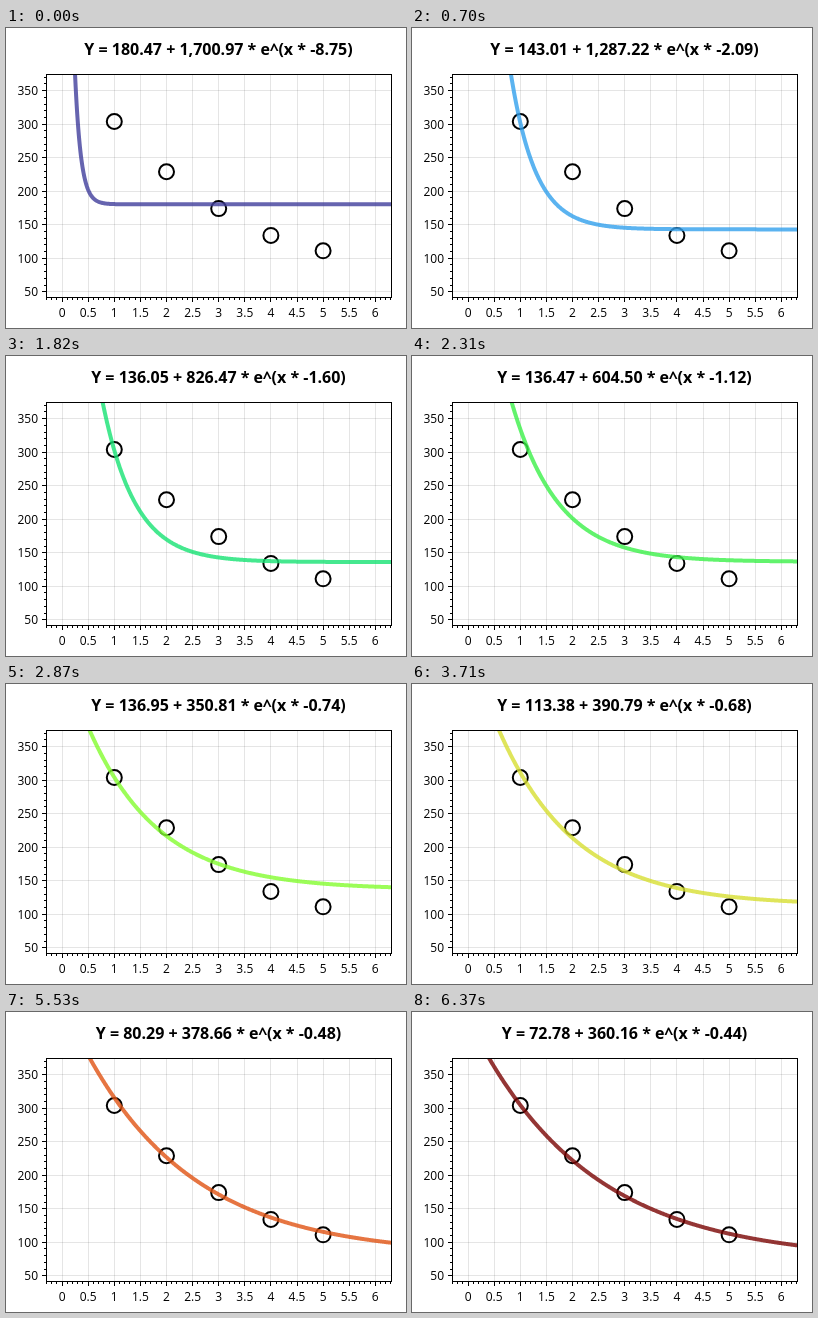
Write an HTML page with a canvas that moves like this. It is 400 by 300 pixels and loops after 8.37 s.

```html
<!DOCTYPE html>
<html lang="en">
<head>
<meta charset="utf-8">
<title>Exponential fit</title>
<style>
  html, body { margin: 0; width: 100%; height: 100%; overflow: hidden; background: #fff; }
  canvas { display: block; }
</style>
</head>
<body>
<canvas id="stage" width="400" height="300"></canvas>
<script>
const ctx = document.getElementById('stage').getContext('2d');
const LOOP = 8370, STEP = 70, END = 6370;
const box = { l: 40, t: 46, r: 385, b: 269 };
const FONT = '"Open Sans", "Noto Sans", sans-serif';

const px = x => 56.1 + x * 52.2;
const py = y => 263.7 - (y - 50) * 0.67;
const snap = v => Math.floor(v) + 0.5;
const mix = (a, b, u) => a + (b - a) * u;

// heights of the samples at x = 1, 2, 3...
const samples = [304, 229, 174, 134, 111];

// milestones of the fit y = a + b * e^(k * x)
const fits = [
  { t: 0, a: 180.47, b: 1700.97, k: -8.75 },
  { t: 700, a: 143.01, b: 1287.22, k: -2.09 },
  { t: 1820, a: 136.05, b: 826.47, k: -1.6 },
  { t: 2870, a: 136.95, b: 350.81, k: -0.74 },
  { t: 3710, a: 113.38, b: 390.79, k: -0.68 },
  { t: 4760, a: 87.18, b: 395.62, k: -0.51 },
  { t: END, a: 72.78, b: 360.16, k: -0.44 }
];

// evenly spaced rainbow stops
const rainbow = [
  0x403e9c, 0x33a1ee, 0x08d6a0, 0x22ec52, 0x80fe30,
  0xcfea31, 0xf5be37, 0xfe8e32, 0xd9450c, 0x7a0403
];

function fitAt(t) {
  const i = Math.max(1, fits.findIndex(f => f.t >= t));
  const p = fits[i - 1], q = fits[i];
  const u = (t - p.t) / (q.t - p.t);
  return { a: mix(p.a, q.a, u), b: mix(p.b, q.b, u), k: p.k * (q.k / p.k) ** u };
}

function colorAt(t) {
  const pos = t / END * (rainbow.length - 1);
  const i = Math.min(Math.floor(pos), rainbow.length - 2);
  const rgb = [16, 8, 0].map(s =>
    Math.round(mix(rainbow[i] >> s & 255, rainbow[i + 1] >> s & 255, pos - i)));
  return `rgba(${rgb},0.8)`;
}

function line(x1, y1, x2, y2) {
  ctx.beginPath();
  ctx.moveTo(x1, y1);
  ctx.lineTo(x2, y2);
  ctx.stroke();
}

function text(str, x, y, font, align) {
  ctx.font = font + ' ' + FONT;
  ctx.textAlign = align;
  ctx.fillText(str, x, y);
}

function drawGrid() {
  ctx.lineWidth = 1;
  ctx.strokeStyle = 'rgba(0,0,0,0.1)';
  for (let x = 0; x <= 6; x += 0.5) line(snap(px(x)), box.t, snap(px(x)), box.b);
  for (let y = 50; y <= 350; y += 50) line(box.l, snap(py(y)), box.r, snap(py(y)));
}

function drawAxes() {
  ctx.lineWidth = 1;
  ctx.strokeStyle = ctx.fillStyle = '#000';
  ctx.strokeRect(box.l + 0.5, box.t + 0.5, box.r - box.l, box.b - box.t);
  for (let i = -3; i <= 63; i++) {
    const x = px(i / 10), major = i % 5 === 0;
    line(snap(x), box.b + 1, snap(x), box.b + (major ? 5 : 3));
    if (major) text(String(i / 10), x, 289, '12px', 'center');
  }
  for (let v = 50; v <= 370; v += 10) {
    const y = py(v), major = v % 50 === 0;
    line(box.l, snap(y), box.l - (major ? 4 : 2), snap(y));
    if (major) text(String(v), 32, Math.round(y + 4.4), '12px', 'right');
  }
}

function drawSamples() {
  ctx.lineWidth = 2;
  ctx.strokeStyle = '#000';
  samples.forEach((y, i) => {
    ctx.beginPath();
    ctx.arc(px(i + 1), py(y), 7.5, 0, Math.PI * 2);
    ctx.stroke();
  });
}

function drawCurve({ a, b, k }, color) {
  ctx.save();
  ctx.beginPath();
  ctx.rect(box.l, box.t, box.r - box.l, box.b - box.t);
  ctx.clip();
  ctx.beginPath();
  for (let x = 0; x <= 6.4; x += 0.01) ctx.lineTo(px(x), py(a + b * Math.exp(k * x)));
  ctx.lineWidth = 4;
  ctx.lineJoin = 'round';
  ctx.strokeStyle = color;
  ctx.stroke();
  ctx.restore();
}

function drawTitle({ a, b, k }) {
  const digits = { minimumFractionDigits: 2, maximumFractionDigits: 2 };
  const [A, B, K] = [a, b, k].map(v => v.toLocaleString('en-US', digits));
  ctx.fillStyle = '#000';
  text(`Y = ${A} + ${B} * e^(x * ${K})`, (box.l + box.r) / 2, 27, 'bold 16px', 'center');
}

function draw(now) {
  const t = Math.min(END, Math.floor((now % LOOP) / STEP) * STEP);
  const fit = fitAt(t);
  ctx.fillStyle = '#fff';
  ctx.fillRect(0, 0, 400, 300);
  drawGrid();
  drawSamples();
  drawCurve(fit, colorAt(t));
  drawAxes();
  drawTitle(fit);
}

const start = performance.now();
function tick() {
  draw(performance.now() - start);
  requestAnimationFrame(tick);
}
tick();
</script>
</body>
</html>
```
